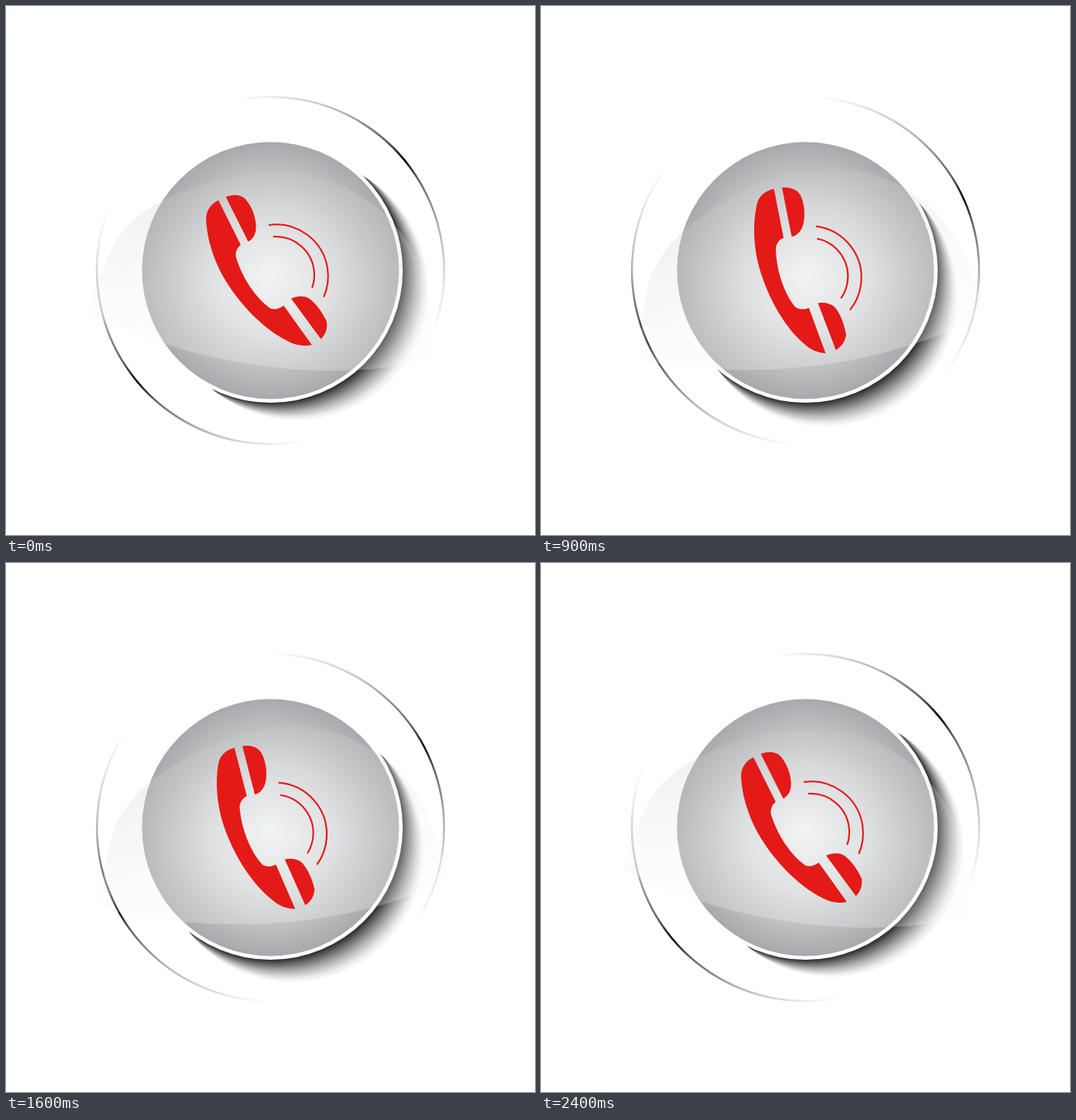
An HTML page with a canvas for the animation above (2.5 s loop, 640 by 640 pixels).

```html
<!DOCTYPE html>
<html>
<head>
<meta charset="utf-8">
<style>
html, body { margin: 0; height: 100%; overflow: hidden; background: #fff }
canvas { display: block }
</style>
</head>
<body>
<canvas id="stage" width="640" height="640"></canvas>
<script>
const ctx = document.getElementById('stage').getContext('2d');
const C = 320, RAD = Math.PI / 180;
const STEP = 100, STEPS = 25;

// Swing in degrees: [step, angle]
const swing = [[0, 0], [2, 1.6], [4, 5.2], [9, 15.4], [12, 20.5], [13, 19],
  [16, 12.2], [20, 3.7], [22, 1.2], [24, 0]];

const handset = new Path2D(
  'M266 231C272 228 284 227 290 234C297 242 302 254 302.5 266C303 276 298 283 293 285Z' +
  'M257 235C247 240 242 248 242 258C243 280 250 304 262 326C280 358 310 390 340 405C351 411 360 412 370 410' +
  'L336 362.5C331 366 326 368 320 366C303 354 286 330 278 303C278 297 279 293 284 289Z' +
  'M345 354C352 351 360 350 367 354C376 361 383 371 388 382C389 390 387 397 381 403Z');

const glare = new Path2D(
  'M100 372Q105 340 130 290C165 225 270 202 330 202C420 202 480 260 500 315' +
  'Q518 365 515 425C440 452 260 452 100 372Z');

function addStops(gradient, stops) {
  for (const [at, color] of stops) gradient.addColorStop(at, color);
  return gradient;
}

function disc(x, y, r, fill) {
  ctx.beginPath();
  ctx.arc(x, y, r, 0, 2 * Math.PI);
  ctx.fillStyle = fill;
  ctx.fill();
}

function arc(x, y, r, from, to) {
  ctx.beginPath();
  ctx.arc(x, y, r, from * RAD, to * RAD);
  ctx.stroke();
}

function turned(deg, draw) {
  ctx.save();
  ctx.translate(C, C);
  ctx.rotate(deg * RAD);
  ctx.translate(-C, -C);
  draw();
  ctx.restore();
}

const shadowX = C + 40 * Math.cos(35 * RAD), shadowY = C + 40 * Math.sin(35 * RAD);
const shadowFill = addStops(ctx.createRadialGradient(shadowX, shadowY, 158.7, C, C, 160),
  [[0, '#fff'], [0.2, '#eaeaea'], [0.5, '#b0b0b0'], [0.8, '#666'], [1, '#2c2c2c']]);

const ax = 185 * Math.cos(50 * RAD), ay = 185 * Math.sin(50 * RAD);
const ringFill = addStops(ctx.createLinearGradient(C - ax, C - ay, C + ax, C + ay),
  [[0, '#fff'], [0.25, '#b4b4b4'], [0.42, '#606060'], [0.5, '#000'],
   [0.58, '#606060'], [0.75, '#b4b4b4'], [1, '#fff']]);

const faceFill = addStops(ctx.createRadialGradient(C, C, 0, C, C, 155.5),
  [[0, '#f6f7f7'], [0.5, '#d9dadb'], [1, '#a8a9ac']]);

const glareFill = addStops(ctx.createLinearGradient(0, 200, 0, 440),
  [[0, 'rgba(196,197,200,.3)'], [0.65, 'rgba(242,243,244,.27)'], [1, 'rgba(250,250,250,.27)']]);

function backdrop() {
  ctx.strokeStyle = ringFill;
  ctx.lineWidth = 2.4;
  arc(C, C, 210, -102, 22);
  arc(C, C, 210, 78, 202);
  disc(shadowX, shadowY, 158.7, shadowFill);
}

function phone() {
  ctx.fillStyle = ctx.strokeStyle = '#e31a18';
  ctx.fill(handset);
  ctx.lineWidth = 2;
  arc(327, 327, 62.7, -98.3, 23.5);
  arc(326.5, 325.5, 46.5, -94, 19.5);
}

function angleAt(step) {
  const i = Math.max(1, swing.findIndex(key => key[0] >= step));
  const [t0, a0] = swing[i - 1], [t1, a1] = swing[i];
  return a0 + (a1 - a0) * (step - t0) / (t1 - t0);
}

function render(now) {
  const angle = angleAt(Math.floor(now / STEP) % STEPS);
  ctx.fillStyle = '#fff';
  ctx.fillRect(0, 0, 640, 640);
  turned(angle, backdrop);
  disc(C, C, 160, '#fff');
  disc(C, C, 155.5, faceFill);
  turned(-angle, () => {
    ctx.fillStyle = glareFill;
    ctx.fill(glare);
  });
  turned(angle, phone);
}

const start = performance.now();
function tick() {
  render(performance.now() - start);
  requestAnimationFrame(tick);
}
tick();
</script>
</body>
</html>
```
